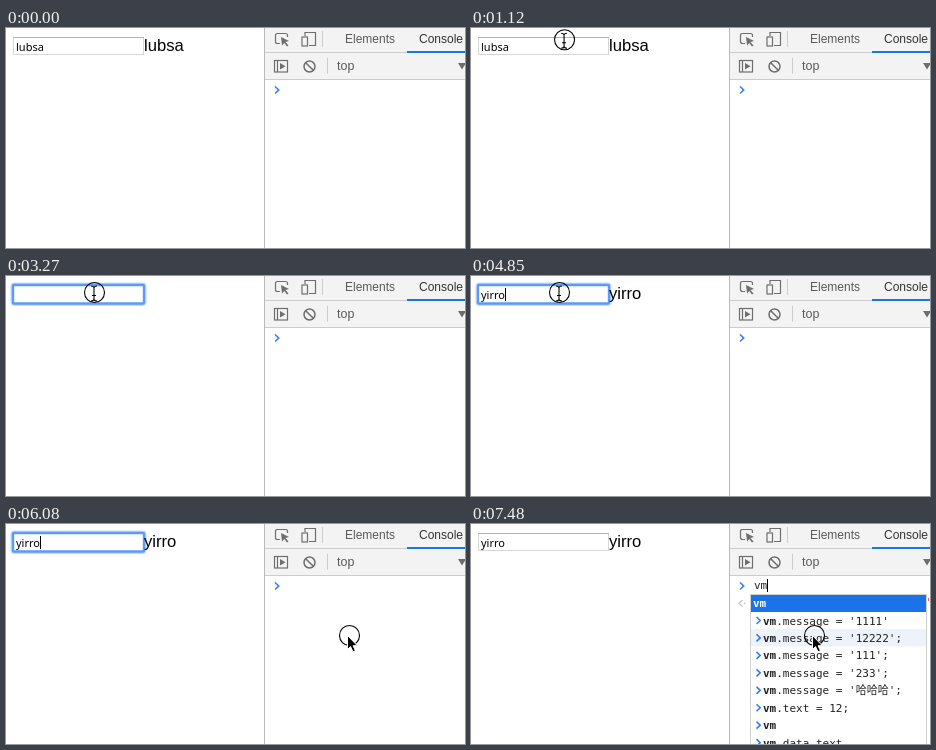
These frames come from a looping animation (459x220 px, 7990 ms). An HTML page:

```html
<!DOCTYPE html>
<html lang="en">
<head>
<meta charset="utf-8">
<title>Two-way binding</title>
<style>
  html, body { margin: 0; width: 100%; height: 100%; overflow: hidden; background: #fff; }
  svg { display: block; width: 459px; height: 220px; }
  .ui { font: 12px "Liberation Sans", Arial, sans-serif; fill: #5a5a5a; }
  .page { font: 16.6px "Liberation Sans", Arial, sans-serif; }
  .field { font: 11px "Noto Sans", sans-serif; }
  .code { font: 11px "DejaVu Sans Mono", "Noto Sans CJK SC", "Noto Sans CJK", monospace; fill: #222; }
  .bold { font-weight: bold; }
  .icon { fill: none; stroke: #6e6e6e; stroke-width: 1.2; }
  .line { fill: none; stroke: #ccc; }
  .chevron { fill: none; stroke: #367cf1; stroke-width: 1.6; }
</style>
</head>
<body>
<svg viewBox="0 0 459 220">
  <!-- page -->
  <g id="blurred" fill="none">
    <rect x="7.5" y="9.5" width="130" height="17" stroke="#d6d6d6"/>
    <path d="M7 9.5H138" stroke="#b4b4b4"/>
  </g>
  <g id="focused" fill="none">
    <rect x="5.5" y="7.5" width="134" height="21.5" rx="3" stroke="#c3d9fa" stroke-width="2"/>
    <rect x="7" y="9" width="131" height="18.5" rx="1" stroke="#5c9bf3" stroke-width="2.4"/>
  </g>
  <text id="field" class="field" x="10" y="23"></text>
  <rect id="fieldCaret" y="12" width="1" height="13"/>
  <text id="echo" class="page" x="138" y="23"></text>

  <!-- developer tools -->
  <rect x="258" width="201" height="220" fill="#fff"/>
  <rect x="258" width="201" height="51" fill="#f3f3f3"/>
  <path class="line" d="M258 24.5H459M258 51.5H459M316.5 3V19M321.5 30V46"/>
  <path d="M258.5 0V220" stroke="#b9b9b9"/>
  <rect x="401" y="23" width="58" height="2" fill="#1a73e8"/>
  <g class="icon">
    <path d="M274 15.5H271.5Q269.5 15.5 269.5 13.5V7.5Q269.5 5.5 271.5 5.5H279.5Q281.5 5.5 281.5 7.5V9"/>
    <path d="M275 9L283 13L279.5 14L282.5 17.5L281 18.5L278.3 15L276 17.5Z" fill="#6e6e6e" stroke="none"/>
    <path d="M299 8V4.5H309.5V17.5H303"/>
    <rect x="296" y="9" width="5.5" height="9"/>
    <rect x="268.5" y="32.5" width="13" height="11.5"/>
    <path d="M271.5 32V44"/>
    <path d="M274 35V41.5L279.5 38.2Z" fill="#6e6e6e" stroke="none"/>
    <circle cx="303.5" cy="38.5" r="5.5" stroke-width="1.5"/>
    <path d="M299.7 34.7L307.3 42.3" stroke-width="1.5"/>
  </g>
  <text class="ui" x="339" y="15">Elements</text>
  <text class="ui" x="413" y="15" style="fill:#333">Console</text>
  <text class="ui" x="331" y="42" style="font-size:12.5px">top</text>
  <path d="M452 35H460L456 41.5Z" fill="#6e6e6e"/>
  <path class="chevron" d="M269 58.5L272.7 62L269 65.5"/>
  <text id="entry" class="code" x="283" y="65"></text>
  <rect id="entryCaret" y="55" width="1" height="13"/>

  <!-- suggestions -->
  <g id="popup">
    <path d="M271.5 76L268 79.3L271.5 82.5" fill="none" stroke="#c4c4c4" stroke-width="1.2"/>
    <circle cx="273.5" cy="79.3" r=".9" fill="#c4c4c4"/>
    <path d="M457.5 74V77" stroke="#e06a60"/>
    <rect x="279.5" y="70.5" width="176" height="160" fill="#fff" stroke="#d0d0d0"/>
    <rect x="280" y="71" width="175" height="17" fill="#1a73e8"/>
    <rect x="280" y="105" width="175" height="17.5" fill="#edf2fb"/>
    <text class="code bold" x="282" y="83" style="fill:#fff">vm</text>
  </g>

  <!-- pointer -->
  <g id="pointer">
    <circle r="10" fill="none" stroke="#000" stroke-width="1.1"/>
    <path id="arrow" d="M-2 0V14L1.1 11.1L3.4 16.3L5.9 15.2L3.6 10.2H7.8Z" stroke="#fff" stroke-width="1"/>
    <path id="beam" d="M-3.5-6.5Q-1-6.5-.5-5Q0-6.5 2.5-6.5M-.5-5V7M-3.5 8.5Q-1 8.5-.5 7Q0 8.5 2.5 8.5M-2.5 3H1.5" fill="none" stroke="#000" stroke-width="1.1"/>
  </g>
</svg>
<script>
const LOOP = 7990;
const $ = id => document.getElementById(id);

const typed = [[0, 'lubsa'], [2520, 'lubs'], [2670, 'lub'], [2880, 'lu'], [3060, 'l'], [3270, ''],
  [4140, 'y'], [4410, 'yi'], [4580, 'yir'], [4730, 'yirr'], [4850, 'yirro']];
const command = [[0, ''], [7370, 'v'], [7430, 'vm']];
const fieldBlink = [[1650, 2130], [2520, 3270], [3630, 5360], [5870, 6140]];
const entryBlink = [[450, 980], [6230, 6770], [7310, LOOP]];
const path = [[450, 150, 197], [830, 112.5, 77.5], [1100, 94, 12], [1240, 91, 10.5], [1450, 88.5, 16.5],
  [5780, 88.5, 16.5], [5930, 220, 70], [6020, 325, 112.5], [6080, 343.5, 111.5], [LOOP, 343.5, 111.5]];

const history = [".message = '1111'", ".message = '12222';", ".message = '111';", ".message = '233';",
  ".message = '哈哈哈';", '.text = 12;', '', '.data.text'];
$('popup').insertAdjacentHTML('beforeend', history.map((rest, i) => {
  const y = 96.5 + i * 17.45;
  return `<path class="chevron" d="M285.5 ${y - 3.5}l3.7 3.5l-3.7 3.5"/>
    <text class="code" x="292" y="${y + 4}"><tspan class="bold">vm</tspan>${rest}</text>`;
}).join(''));

const valueAt = (list, t) => list.findLast(([start]) => t >= start)[1];
const within = (spans, t) => spans.some(([from, to]) => t >= from && t < to);
const show = (id, on) => $(id).setAttribute('visibility', on ? 'inherit' : 'hidden');

function pointAt(t) {
  const i = Math.max(1, path.findIndex(([end]) => t < end));
  const [t0, x0, y0] = path[i - 1], [t1, x1, y1] = path[i];
  const k = Math.max(0, (t - t0) / (t1 - t0));
  return [x0 + (x1 - x0) * k, y0 + (y1 - y0) * k];
}

function setText(id, text) {
  if ($(id).textContent !== text) $(id).textContent = text;
}

function placeCaret(id, textId, on) {
  const text = $(textId);
  const width = text.textContent ? text.getComputedTextLength() : 0;
  $(id).setAttribute('x', Math.round(+text.getAttribute('x') + width));
  show(id, on);
}

function draw(t) {
  const name = valueAt(typed, t);
  setText('field', name);
  setText('echo', name);
  setText('entry', valueAt(command, t));
  placeCaret('fieldCaret', 'field', within(fieldBlink, t));
  placeCaret('entryCaret', 'entry', within(entryBlink, t));

  const focus = t >= 1650 && t < 6140;
  show('focused', focus);
  show('blurred', !focus);
  show('popup', t >= 7480);

  const [x, y] = pointAt(t);
  const overField = x > 7 && x < 138 && y > 9 && y < 28;
  $('pointer').setAttribute('transform', `translate(${x} ${y})`);
  show('pointer', t >= 450);
  show('arrow', !overField);
  show('beam', overField);
}

const start = performance.now();
function tick() {
  draw((performance.now() - start) % LOOP);
  requestAnimationFrame(tick);
}
tick();
</script>
</body>
</html>
```
